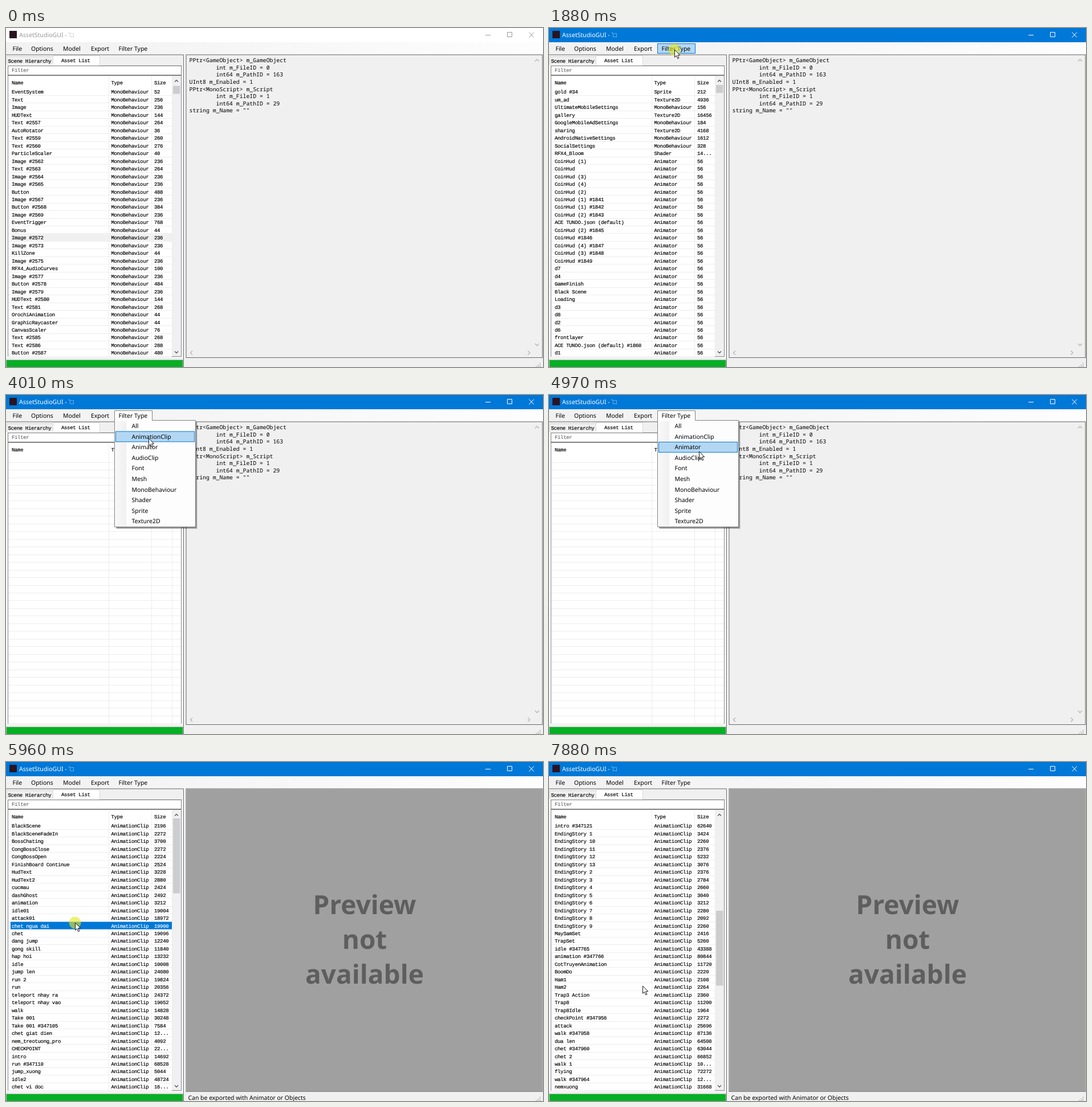
Recreate the animation shown at these times as an HTML page. Size 942x595 px, loop 8000 ms.

```html
<!DOCTYPE html>
<html lang="en">
<head>
<meta charset="utf-8">
<title>AssetStudioGUI</title>
<style>
html, body { margin: 0; width: 100%; height: 100%; overflow: hidden; background: #f0f0f0; }
svg { display: block; }
text { font: 10.45px "Noto Sans", "Open Sans", sans-serif; text-rendering: geometricPrecision; white-space: pre; }
.cell { color: #000; }
.cell text {
  font: 9px "Liberation Mono", monospace; letter-spacing: -.34px;
  fill: currentColor; stroke: currentColor; stroke-width: .18px;
}
.cell .hint { color: #6d6d6d; }
.code text { font: 9.8px "Noto Sans Mono", "DejaVu Sans Mono", monospace; }
.big text { font-size: 46px; font-weight: 700; fill: #5e5e5e; text-anchor: middle; }
.line { fill: none; stroke: #696969; }
.grid { fill: none; stroke: #ededed; }
.arrow { fill: none; stroke: #b4b4b4; stroke-width: 1.3; }
.dark { stroke: #555; }
.hot { fill: #b3d7f3; stroke: #0078d7; }
#title { --ink: #999; --bar: #fff; }
#title.on { --ink: #fff; --bar: #0078d7; }
#title .bar { fill: var(--bar); }
#title text { fill: var(--ink); font-size: 10.6px; }
#title path { fill: none; stroke: var(--ink); }
</style>
</head>
<body>
<svg id="stage" width="942" height="595" viewBox="0 0 942 595">
  <defs>
    <linearGradient id="strip"><stop stop-color="#f1f1f1"/><stop offset="1" stop-color="#fdfdfd"/></linearGradient>
    <linearGradient id="gutter"><stop stop-color="#f8f8f8"/><stop offset="1" stop-color="#f0f0f0"/></linearGradient>
  </defs>
  <rect width="942" height="595" fill="#f0f0f0"/>

  <g id="title">
    <rect class="bar" width="942" height="25"/>
    <rect x="6" y="5" width="13" height="13" fill="#2b1420"/>
    <text x="23" y="16">AssetStudioGUI - `□</text>
    <path d="M841 12.5h9M879.5 7.5h8v8h-8zM917.5 7.5l8.5 9M926 7.5l-8.5 9"/>
  </g>

  <rect y="25" width="942" height="21" fill="url(#strip)"/>
  <rect id="hot" class="hot" x="190.5" y="27.5" width="66" height="17"/>
  <g id="bar"></g>

  <path class="line" d="M0 47H311.5V595"/>
  <path stroke="#fff" d="M312.5 47V595"/>
  <g class="cell">
    <rect x="1.5" y="50.5" width="81" height="15" fill="#f0f0f0" stroke="#d9d9d9"/>
    <rect y="65" width="310" height="513" fill="#fcfcfc"/>
    <rect x="82" y="48" width="82" height="18" fill="#fff"/>
    <path fill="none" stroke="#d9d9d9" d="M82.5 65V48.5H164.5V65.5H310"/>
    <text x="3.5" y="61">Scene Hierarchy</text>
    <text x="97" y="59.5">Asset List</text>
    <rect id="filter" x="3.5" y="66.5" width="304" height="16" fill="#fff" stroke="#7a7a7a"/>
    <text class="hint" x="10" y="77">Filter</text>
    <rect x="3.5" y="83.5" width="304" height="493" fill="#fff" stroke="#828790"/>
    <path class="grid" d="M180.5 84V576M255.5 84V576M291.5 84V576"/>
    <path id="lines" class="grid"/>
    <text x="10" y="99">Name</text>
    <text x="184.5" y="99">Type</text>
    <text x="260" y="99">Size</text>
    <g id="rows"></g>
  </g>
  <g id="scroll">
    <rect x="292" y="84" width="15" height="492" fill="#f0f0f0"/>
    <rect id="thumb" x="293" width="12.5" fill="#cdcdcd"/>
    <path class="arrow dark" d="M296 94.5l3-3 3 3M296 567.5l3 3 3-3"/>
  </g>
  <rect x="0.5" y="582.5" width="310" height="14" fill="#06b025" stroke="#bcbcbc"/>

  <rect class="line" x="316" y="47" width="625" height="531.5"/>
  <g id="code" class="code"></g>
  <path class="arrow" d="M928 58.5l3.5-3.5 3.5 3.5M928 554l3.5 3.5 3.5-3.5M327 566.5l-3.5 3.5 3.5 3.5M915.5 566.5l3.5 3.5-3.5 3.5"/>
  <path stroke="#a8a8a8" stroke-width="1.6" stroke-dasharray="1.6" d="M936 588.5h3.2M932.8 591.5h6.4M929.6 594.3h9.6"/>
  <g id="preview">
    <rect x="316.5" y="47.5" width="624" height="531" fill="#a0a0a0"/>
    <g class="big">
      <text x="629" y="267">Preview</text>
      <text x="629" y="328">not</text>
      <text x="629" y="389">available</text>
    </g>
    <text x="319.5" y="593">Can be exported with Animator or Objects</text>
  </g>

  <g id="menu">
    <rect x="194" y="48" width="141.5" height="187" opacity=".18"/>
    <rect x="193" y="47" width="141.5" height="187" opacity=".3"/>
    <path fill="#fdfdfd" stroke="#808080" d="M190.5 27.5H256.5V44.5H332.5V231.5H190.5z"/>
    <rect x="192" y="46" width="19" height="184" fill="url(#gutter)"/>
    <text x="197.5" y="40">Filter Type</text>
    <rect id="pick" class="hot" x="192.5" width="138" height="18"/>
  </g>
  <circle id="halo" r="10.5" fill="#e6e620" opacity=".62"/>
  <path id="cursor" fill="#fff" stroke="#000" stroke-width=".9" stroke-linejoin="round"
    d="M.5 0V13.3L3.5 10.5 5.7 15.7 7.9 14.8 5.7 9.7H9.7z"/>
</svg>

<script>
const $ = id => document.getElementById(id);
const PITCH = 13.47, VISIBLE = 35, ITEM = 18.55, LOOP = 8000;
const FIRST = 1827, LAST = 2553;

function add(parent, tag, attrs, label) {
  const node = document.createElementNS('http://www.w3.org/2000/svg', tag);
  for (const key in attrs) node.setAttribute(key, attrs[key]);
  if (label) node.textContent = label;
  return parent.appendChild(node);
}
const show = (id, on) => $(id).setAttribute('visibility', on ? 'visible' : 'hidden');

// Rows read "name=size=type"; a trailing # takes the row's index.
const TYPES = { M: 'MonoBehaviour', T: 'Texture2D', S: 'Sprite', H: 'Shader' };
const parse = (list, type, size, base) => list.trim().split(/\s*,\s*/).map((item, i) => {
  const [name, own, kind] = item.split('=');
  return [name.replace(/#$/, '#' + (base + i)), TYPES[kind] || type, own || size];
});

const head = parse(`gold #34=212=S, um_ad=4936=T, UltimateMobileSettings=156=M, gallery=16456=T,
GoogleMobileAdSettings=184=M, sharing=4168=T, AndroidNativeSettings=1612=M, SocialSettings=328=M,
RFX4_Bloom=14...=H, CoinHud (1), CoinHud, CoinHud (3), CoinHud (4), CoinHud (2), CoinHud (1) #,
CoinHud (1) #, CoinHud (2) #, ACE TUNDO.json (default), CoinHud (2) #, CoinHud #, CoinHud (4) #,
CoinHud (3) #, CoinHud #, d7, d4, GameFinish, Black Scene, Loading, d3, d8, d2, d6, frontlayer,
ACE TUNDO.json (default) #, d1`, 'Animator', '56', FIRST);

const tail = parse(`EventSystem=52, Text=256, Image, HUDText=144, Text #=264, AutoRotator=36, Text #=260,
Text #=276, ParticleScaler=40, Image #, Text #=264, Image #, Image #, Button=488, Image #, Button #=384,
Image #, EventTrigger=768, Bonus=44, Image #, Image #, KillZone=44, Image #, RFX4_AudioCurves=100, Image #,
Button #=484, Image #, HUDText #=144, Text #=268, OrochiAnimation=44, GraphicRaycaster=44, CanvasScaler=76,
Text #=268, Text #=288, Button #=480`, 'MonoBehaviour', '236', LAST);

const clips = parse(`BlackScene=2196, BlackSceneFadeIn=2272, BossChating=3700, CongBossClose=2272,
CongBossOpen=2224, FinishBoard Continue=2524, HudText=3228, HudText2=2880, cucmau=2424, dashGhost=2492,
animation=3212, idle01=19004, attack01=18972, chet ngua dai=19900, chet=19096, dang jump=12240,
gong skill=11840, hap hoi=13232, idle=10008, jump len=24080, run 2=19824, run=20356,
teleport nhay ra=24372, teleport nhay vao=19052, walk=14828, Take 001=30248, Take 001 #347105=7584,
chet giat dien=12..., nem_treotuong_pro=4092, CHECKPOINT=22..., intro=14692, run #347110=68528,
jump_xuong=5044, idle2=48724, chet vi doc=16..., jump_len=4320, nem_idle_pro=25628,
nem_jumpxuong=19908, nem_run=40040, treo_tuong=4204, nem_jumplen=11220, chet_chay=20...,
intro #347121=62640, EndingStory 1=3424, EndingStory 10=2260, EndingStory 11=2376,
EndingStory 12=5232, EndingStory 13=3076, EndingStory 2=2376, EndingStory 3=2784, EndingStory 4=2660,
EndingStory 5=3040, EndingStory 6=3212, EndingStory 7=2280, EndingStory 8=2092, EndingStory 9=2260,
MaySamSet=2416, TrapSet=5260, idle #347765=43388, animation #347766=80844, CotTruyenAnimation=11720,
BoomDo=2220, Ham1=2108, Ham2=2264, Trap3 Action=2360, Trap8=11200, Trap8Idle=1964,
checkPoint #347956=2272, attack=25696, walk #347958=87136, dua len=64508, chet #347960=63044,
chet 2=66852, walk 1=10..., flying=72272, walk #347964=12..., nemxuong=31668`, 'AnimationClip', '', 0);

function asset(i) {
  if (i >= LAST) return tail[i - LAST];
  if (i < FIRST + VISIBLE) return head[i - FIRST];
  if (i < 2100) return ['CoinHud #' + i, 'Animator', '56'];
  const [name, type, size] = tail[i * 7919 % VISIBLE];
  return [name.replace(/ #.*/, '') + ' #' + i, type, size];
}

// Fixed labels
[['File', 11.5], ['Options', 44], ['Model', 100], ['Export', 149], ['Filter Type', 197.5]]
  .forEach(([label, x]) => add($('bar'), 'text', { x, y: 40 }, label));
['All', 'AnimationClip', 'Animator', 'AudioClip', 'Font', 'Mesh', 'MonoBehaviour', 'Shader', 'Sprite', 'Texture2D']
  .forEach((label, i) => add($('menu'), 'text', { x: 220.5, y: 58.2 + i * ITEM }, label));
['PPtr<GameObject> m_GameObject', '\tint m_FileID = 0', '\tint64 m_PathID = 163', 'UInt8 m_Enabled = 1',
  'PPtr<MonoScript> m_Script', '\tint m_FileID = 1', '\tint64 m_PathID = 29', 'string m_Name = ""']
  .forEach((line, i) => add($('code'), 'text',
    { x: line[0] === '\t' ? 368.5 : 321.5, y: 60 + i * 12.64 }, line.trim()));

const rows = Array.from({ length: VISIBLE }, (_, i) => {
  const y = 115.4 + i * PITCH;
  return {
    back: add($('rows'), 'rect', { x: 8, y: y - 10, width: 283, height: PITCH - 0.4 }),
    cells: [10, 184.5, 260].map(x => add($('rows'), 'text', { x, y }))
  };
});

// Stepped tracks: [time, value]
const at = (track, t) => track.reduce((now, [time, value]) => t >= time ? value : now, track[0][1]);
const view = [[0, 'all'], [3160, 'none'], [5210, 'clips']];
const opened = [[0, false], [2430, true], [3160, false], [3540, true], [5210, false]];
const pressed = [[0, false], [1880, true], [1940, false], [2430, true], [2510, false], [3080, true], [3160, false],
  [3540, true], [3620, false], [5150, true], [5210, false], [5880, true], [6040, false]];
const clipTop = [[0, 0], [7160, 3], [7240, 9], [7310, 15], [7400, 21], [7700, 27], [7790, 36], [7880, 42]];
const clipPick = [[0, -1], [5880, 13], [6130, 14], [6210, 15], [6290, 16], [6370, 17], [6450, 18], [6520, 19],
  [6600, 20], [6670, 21], [6760, 23], [6840, 24], [6920, 26], [7000, 27]];

function allTop(t) {
  const steps = (from, most) => Math.max(0, Math.min(most, Math.floor((t - from) / 78.5) + 1));
  return LAST - 45 * steps(120, 8) - 61 * steps(980, 6);
}

const SHOWN = 1450;
const path = [[SHOWN, 262, 190], [1780, 220, 38], [2750, 220, 38], [2910, 236, 54], [3330, 236, 54], [3500, 222, 30],
  [3800, 222, 30], [4010, 250, 76], [4360, 250, 76], [4820, 265, 106], [4900, 265, 106], [4970, 263, 99],
  [5050, 263, 99], [5150, 262, 75], [5230, 262, 75], [5770, 121, 282], [6040, 121, 282], [6300, 163, 394],
  [7700, 163, 394], [7790, 164, 393]];

function pointer(t) {
  const next = path.findIndex(p => p[0] > t);
  if (next < 0) return path[path.length - 1].slice(1);
  if (next === 0) return path[0].slice(1);
  const [t0, x0, y0] = path[next - 1], [t1, x1, y1] = path[next];
  const k = (t - t0) / (t1 - t0), e = k * k * (3 - 2 * k);
  return [x0 + (x1 - x0) * e, y0 + (y1 - y0) * e];
}

let drawn = '';
function drawList(mode, top, pick) {
  const key = [mode, top, pick].join();
  if (key === drawn) return;
  drawn = key;
  const empty = mode === 'none', isClips = mode === 'clips';
  rows.forEach(({ back, cells }, i) => {
    const n = top + i, on = !empty && n === pick;
    const data = empty ? ['', '', ''] : isClips ? clips[n] : asset(n);
    back.setAttribute('fill', on ? (isClips ? '#0078d7' : '#f0f0f0') : 'none');
    cells.forEach((cell, c) => {
      cell.textContent = data[c];
      cell.style.color = on && isClips ? '#fff' : '#000';
    });
  });
  const right = empty ? 307 : 291;
  $('lines').setAttribute('d', rows.map((_, i) => `M4 ${Math.round(118 + i * PITCH) + 0.5}H${right}`).join(''));
  show('scroll', !empty);
  $('thumb').setAttribute('y', isClips ? 99 + top * 3.857 : 100 + (top - FIRST) / 450);
  $('thumb').setAttribute('height', isClips ? 131.5 : 14);
}

function draw(t) {
  const mode = at(view, t), open = at(opened, t), visible = t >= SHOWN;
  const [x, y] = pointer(t);
  const over = (l, u, r, d) => visible && x >= l && x <= r && y >= u && y <= d;

  $('title').classList.toggle('on', t >= 1880);
  if (mode === 'clips') drawList(mode, at(clipTop, t), at(clipPick, t));
  else drawList(mode, mode === 'all' ? allTop(t) : 0, 2572);

  show('preview', t >= 5880);
  show('menu', open);
  show('hot', !open && over(190, 27, 257, 45));
  $('filter').setAttribute('stroke', !open && over(3, 66, 308, 83) ? '#171717' : '#7a7a7a');
  const item = Math.floor((y - 45) / ITEM);
  show('pick', open && item >= 0);
  $('pick').setAttribute('y', 45.5 + item * ITEM);

  const place = `translate(${x.toFixed(2)} ${y.toFixed(2)})`;
  show('halo', at(pressed, t));
  show('cursor', visible);
  $('halo').setAttribute('transform', place);
  $('cursor').setAttribute('transform', place);
}

const start = performance.now();
function tick() {
  draw((performance.now() - start) % LOOP);
  requestAnimationFrame(tick);
}
tick();
</script>
</body>
</html>
```
